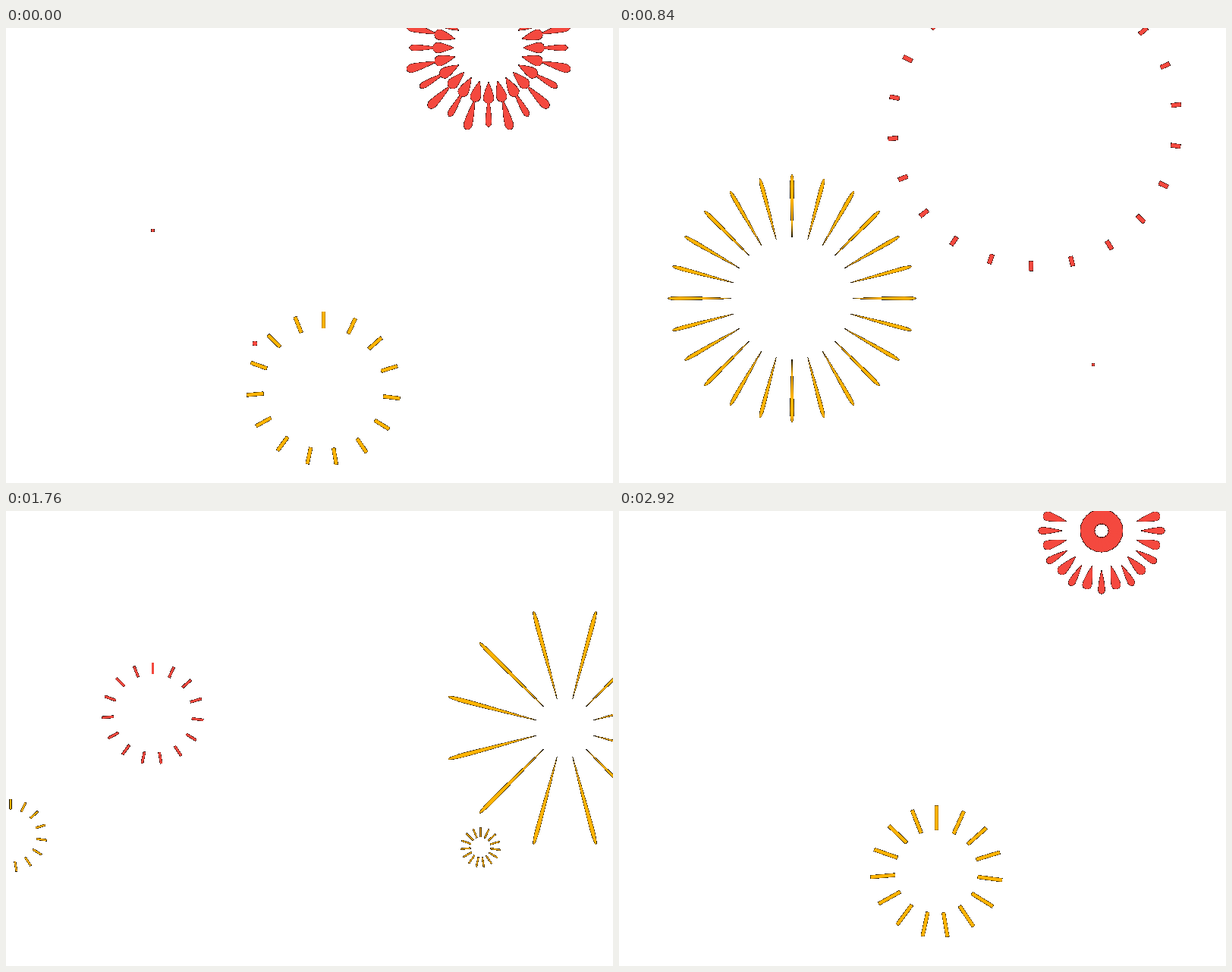
An HTML page with a canvas for the animation above (2960 ms loop, 800 by 600 pixels).

```html
<!DOCTYPE html>
<html lang="en">
<head>
<meta charset="utf-8">
<title>Fireworks</title>
<style>
  html, body { margin: 0; width: 100%; height: 100%; overflow: hidden; background: #fff; }
  canvas { display: block; width: 800px; height: 600px; }
</style>
</head>
<body>
<canvas id="stage" width="800" height="600"></canvas>
<script>
const LOOP = 2960, STEP = 40, W = 800, H = 600, EDGE = 12;
const RED = '#f4493f', GOLD = '#ffb400';
const ctx = document.getElementById('stage').getContext('2d', { willReadFrequently: true });

const clamp = v => Math.max(0, Math.min(1, v));
const smooth = v => { const u = clamp(v); return u * u * (3 - 2 * u); };
const rad = deg => deg * Math.PI / 180;
const fan = (count, angle) => Array.from({ length: count }, (_, i) => angle(i));

// Every burst has a start, a life and a draw function of its age.
const bursts = [];
const add = (start, life, draw) => bursts.push({ start, life, draw });

function dashes(x, y, color, angles, inner, outer, width) {
  ctx.strokeStyle = ctx.fillStyle = color;
  ctx.lineWidth = width;
  ctx.beginPath();
  for (const a of angles) {
    const c = Math.sin(rad(a)), s = -Math.cos(rad(a));
    ctx.moveTo(x + c * inner, y + s * inner);
    ctx.lineTo(x + c * outer, y + s * outer);
  }
  ctx.stroke();
  if (inner > 0) return;
  ctx.beginPath();
  ctx.arc(x, y, width / 2 + Math.min(outer, width / 3), 0, 7);
  ctx.fill();
}

// Lines that grow out of a dot, then shrink from behind.
const sparkAngles = fan(15, i => i * 24.35 - (i > 7 ? 2.6 : 0));
function spark(x, y, color, r, ...starts) {
  for (const start of starts) add(start, 395, p => {
    const outer = r * smooth(clamp(p / 360) ** 1.32);
    const inner = r * smooth((p - 155) / 250);
    dashes(x, y, color, sparkAngles, inner, outer, r * 0.042);
  });
}

// A wide circle of short dashes that slows down as it opens.
const ringAngles = fan(22, i => i * 16.5);
const spread = p => 1 - (1 - clamp(p / 700) ** 1.4) ** 5.48;
function ring(x, y, color, start) {
  const r = 217;
  add(start, 560, p => {
    const outer = r * spread(p);
    const inner = Math.max(0, Math.min(r * spread(p * 0.88), outer - 4));
    dashes(x, y, color, ringAngles, inner, outer, 5.4);
  });
}

function petal(inner, outer, width) {
  const h = width / 2, len = outer - inner;
  const cap = Math.min(len * 0.6, Math.max(h, len * 0.18));
  const b = outer - cap, bend = inner + (b - inner) * 0.6;
  ctx.beginPath();
  ctx.moveTo(inner, 0);
  ctx.quadraticCurveTo(bend, -h * 0.85, b, -h);
  ctx.ellipse(b, 0, cap, h, 0, -Math.PI / 2, Math.PI / 2);
  ctx.quadraticCurveTo(bend, h * 0.85, inner, 0);
  ctx.fill();
}

// Petals that fly out, lengthen and thin to needles.
function flower(x, y, color, start, { reach, width = 15, first = 0, step = 30, stretch = 1 }) {
  const life = 470;
  add(start, life, p => {
    const u = (p + 4) / (life + 4);
    const outer = reach * u ** 0.4;
    const inner = outer - reach * stretch * (0.1 + 0.5 * u);
    ctx.fillStyle = color;
    for (let a = first; a < 360; a += step) {
      ctx.save();
      ctx.translate(x, y);
      ctx.rotate(rad(a));
      petal(inner, outer, width * (1 - u));
      ctx.restore();
    }
  });
}

ring(328, 416, RED, 2958);
ring(548, 126, RED, 518);
ring(372, 165, GOLD, 940);
ring(335, 357, RED, 1909);

flower(228, 356.5, GOLD, 164, { reach: 135 });
flower(228, 356.5, GOLD, 520, { reach: 190, step: 15 });
flower(736.5, 286, GOLD, 1426, { reach: 182, width: 18, first: 15, stretch: 1.45 });
flower(636, 26, RED, 2871, { reach: 200, width: 10 });
flower(636, 26, RED, 2894, { reach: 240, width: 13, first: 15 });
flower(636, 26, RED, 2920, { reach: 190, step: 15 });

spark(193.5, 267, RED, 71, 1069, 1440, 2922);
spark(625, 444, RED, 53, 790);
spark(625.5, 443.5, GOLD, 37, 1503);
spark(639.5, 186, GOLD, 106, 1080);
spark(6, 428, GOLD, 53, 1454);
spark(617, 235, RED, 52, 1883);
spark(708, 86, RED, 72, 1943);
spark(418.5, 475.5, GOLD, 107, 2150, 2638);

// Hard edges, darkened where a shape only partly covers a pixel.
function harden() {
  const img = ctx.getImageData(0, 0, W, H), d = img.data;
  for (let i = 3; i < d.length; i += 4) {
    const a = d[i];
    if (a === 0 || a === 255) continue;
    if (a < EDGE) { d[i] = 0; continue; }
    for (let c = 1; c < 4; c++) d[i - c] = d[i - c] * a / 255;
    d[i] = 255;
  }
  ctx.putImageData(img, 0, 0);
}

function draw(now) {
  ctx.clearRect(0, 0, W, H);
  for (const b of bursts) {
    const age = (now - b.start + LOOP) % LOOP;
    if (age <= b.life) b.draw(age);
  }
  harden();
}

const begin = performance.now();
let shown = 0;
function tick() {
  const now = Math.floor((performance.now() - begin) % LOOP / STEP) * STEP;
  if (now !== shown) draw(shown = now);
  requestAnimationFrame(tick);
}
draw(0);
requestAnimationFrame(tick);
</script>
</body>
</html>
```
